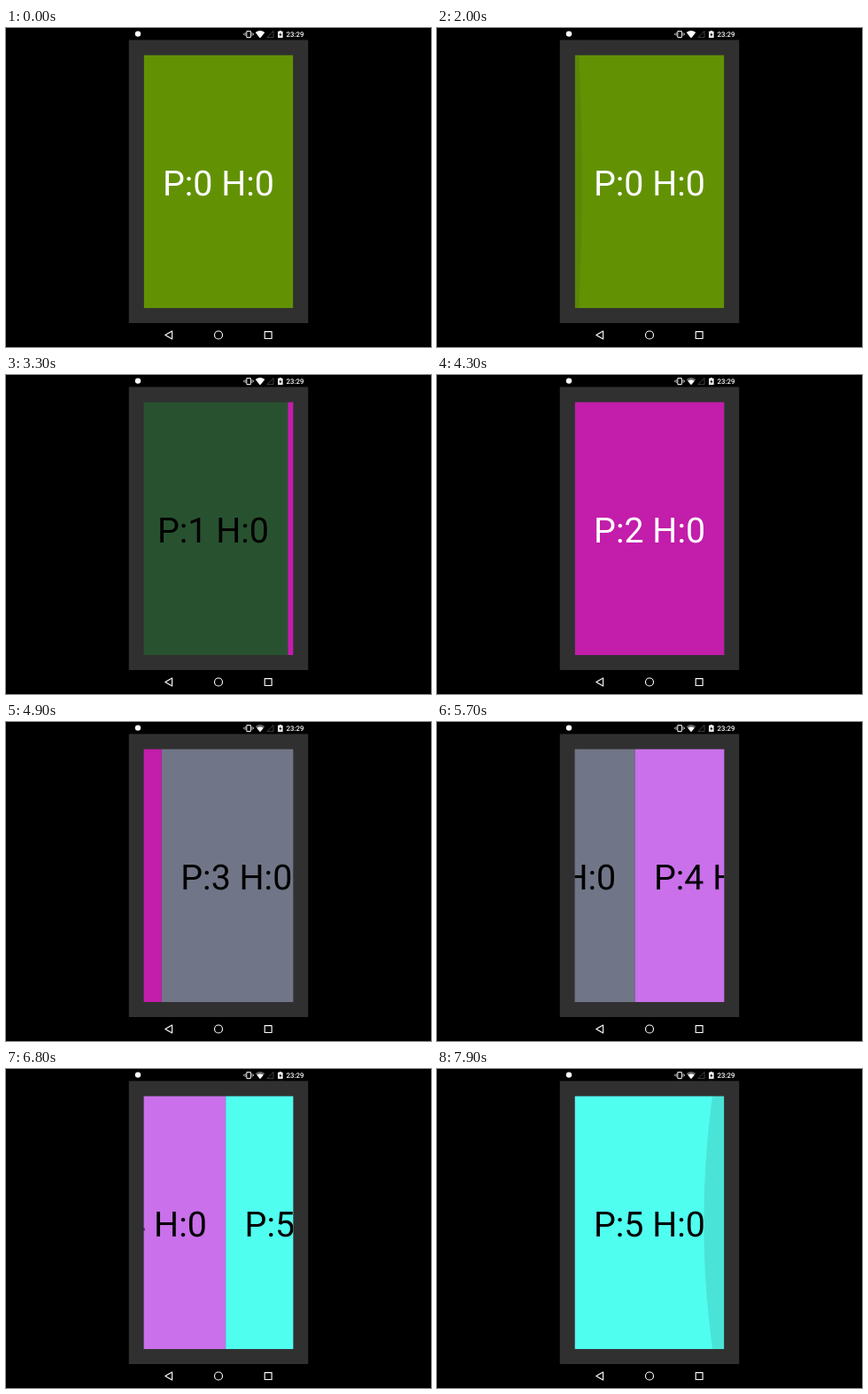
These frames come from a looping animation (480 by 360 pixels, 8 s). An HTML page:

```html
<!DOCTYPE html>
<html lang="en">
<head>
<meta charset="utf-8">
<title>Pager</title>
<style>
  html, body { margin: 0; width: 100%; height: 100%; overflow: hidden; background: #000; }
  #stage { display: block; width: 480px; height: 360px; }
  text { font-family: Roboto, "Open Sans", sans-serif; text-rendering: geometricPrecision; }
  .label { font-size: 39.375px; text-anchor: middle; }
  .clock { font-size: 7.875px; font-weight: 500; fill: #fff; }
  .nav { fill: none; stroke: #fff; stroke-width: 1.125; stroke-linejoin: round; }
</style>
</head>
<body>
<svg id="stage" viewBox="0 0 480 360">
  <rect width="480" height="360"/>
  <rect x="138.75" y="13.5" width="202.5" height="319.5" fill="#303030"/>

  <!-- status bar -->
  <circle cx="149" cy="6.6" r="3.2" fill="#fff"/>
  <rect x="271.8" y="3.6" width="4.6" height="7" rx=".6" fill="none" stroke="#ddd" stroke-width="1.1"/>
  <path d="M270.2 5v4M278 5v4M268.8 6v2M279.4 6v2" stroke="#ddd" stroke-width=".8"/>
  <path id="wifi" d="M287 11.2 281.7 4.9Q287 1.3 292.3 4.9Z" fill="#fff"/>
  <path d="M287 11.2 283.3 6.8Q287 4.4 290.7 6.8Z" fill="#fff"/>
  <path d="M302 3.5V10.7H294.8Z" fill="none" stroke="#555" stroke-width=".8"/>
  <path d="M308.8 3h2v.8H312.6V11H307V3.8h1.8Z" fill="#fff"/>
  <path d="M310.3 4.9 308.3 7.9h1.2v2.2l2-3.2h-1.2Z" fill="#000"/>
  <text class="clock" x="316.6" y="10">23:29</text>

  <!-- navigation bar -->
  <path class="nav" d="M187.6 342V351L179.8 346.5Z"/>
  <circle class="nav" cx="240" cy="346.5" r="4.5"/>
  <rect class="nav" x="292.2" y="342.6" width="7.9" height="7.9"/>

  <svg x="155.625" y="30.375" width="168.75" height="285.75" overflow="hidden">
    <g id="strip"></g>
    <ellipse id="glow" fill="#212121"/>
  </svg>
</svg>
<script>
const LOOP = 8000, STEP = 100, W = 168.75, H = 285.75;

// fill and text colour of each page
const pages = [
  ['#629204', '#fff'], ['#28522f', '#000'], ['#c31dab', '#fff'],
  ['#707687', '#000'], ['#c970ea', '#000'], ['#50fef0', '#000']
];

// The second page is first nudged a little, then swiped.
const NUDGE = .0356;
const swipes = [
  { start: 2300, span: 950, by: 1 },
  { start: 3200, span: 100, by: NUDGE },
  { start: 3400, span: 1050, by: 1 - NUDGE },
  { start: 4300, span: 1100, by: 1 },
  { start: 5400, span: 800, by: 1 },
  { start: 6300, span: 1620, by: 1 }
];

const $ = id => document.getElementById(id);
const set = (el, attrs) => Object.entries(attrs).forEach(([k, v]) => el.setAttribute(k, v));
const progress = (t, start, span) => Math.min(1, Math.max(0, (t - start) / span));

// slow drag, quick fling, long settle
const fling = x => 1 - (1 - x * x) ** 6;

const scrollAt = t =>
  swipes.reduce((sum, s) => sum + s.by * fling(progress(t, s.start, s.span)), 0);

// Pulled at the left edge, then receding; a fresh pull at the right ends the loop.
function glowAt(t) {
  if (t >= 7900) return { right: true, stretch: .4, alpha: .12 };
  const pull = Math.sqrt(progress(t, 1000, 700));
  const fade = (1 - progress(t, 1700, 600)) ** 2;
  return { right: false, stretch: .56 * pull * fade, alpha: .34 * pull * fade };
}

// A circular arc along the edge, squashed towards it.
function drawGlow({ right, stretch, alpha }) {
  const r = H * 1.5;
  const offset = r * Math.cos(Math.PI / 6) * stretch;
  set($('glow'), {
    cx: right ? W + offset : -offset, cy: H / 2,
    rx: r * stretch, ry: r, opacity: alpha
  });
}

function draw(t) {
  set($('strip'), { transform: `translate(${-scrollAt(t) * W} 0)` });
  set($('wifi'), { fill: t >= 3500 ? '#666' : '#fff' });
  drawGlow(glowAt(t));
}

$('strip').innerHTML = pages.map(([fill, ink], i) =>
  `<rect x="${i * W}" width="${W}" height="${H}" fill="${fill}"/>` +
  `<text class="label" x="${(i + .5) * W}" y="158.9" fill="${ink}">P:${i} H:0</text>`
).join('');

const start = performance.now();
function tick() {
  const t = (performance.now() - start) % LOOP;
  draw(Math.floor(t / STEP) * STEP);
  requestAnimationFrame(tick);
}
tick();
</script>
</body>
</html>
```
